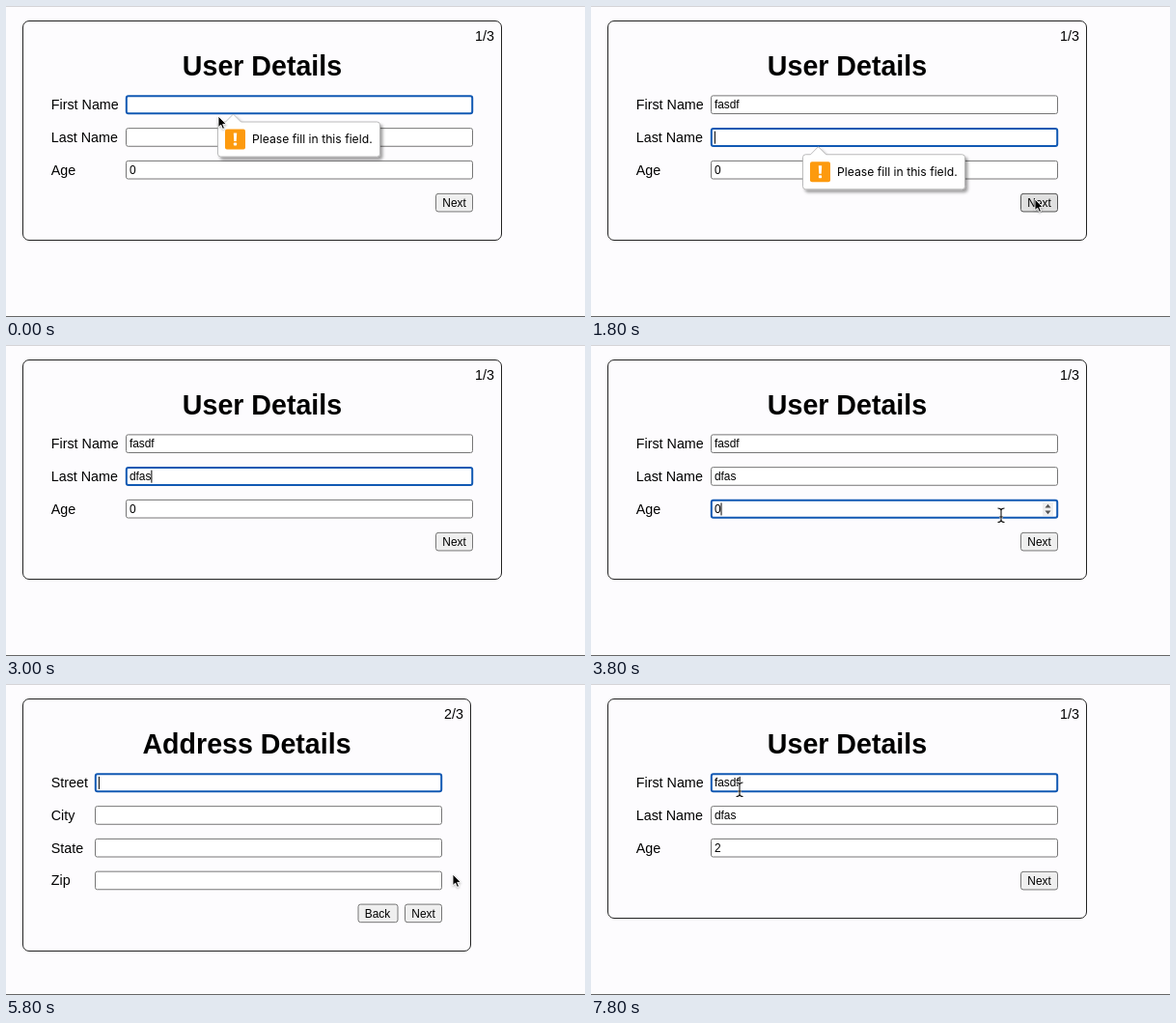
Write an HTML page that moves like this. It is 600x322 px and loops after 8 s.

```html
<!DOCTYPE html>
<html lang="en">
<head>
<meta charset="utf-8">
<title>Multi-step form</title>
<style>
  html, body { margin: 0; width: 100%; height: 100%; overflow: hidden; background: #fdfcfe; }
  svg { display: block; width: 100vw; height: 100vh; font-family: "Liberation Sans", Arial, sans-serif; }
  .label { font-size: 14.3px; }
  .control { font-size: 11.9px; }
  .title { font-size: 28.6px; font-weight: bold; text-anchor: middle; }
  .hint { font: 12.2px Inter, "Open Sans", sans-serif; }
</style>
</head>
<body>
<svg id="stage" viewBox="0 0 600 322">
  <defs>
    <filter id="shadow" x="-10%" y="-20%" width="125%" height="160%">
      <feDropShadow dx="2.5" dy="3" stdDeviation="1.8" flood-opacity=".38"/>
    </filter>
    <filter id="soft" x="-50%" y="-50%" width="200%" height="200%">
      <feDropShadow dx="0" dy="1" stdDeviation=".8" flood-opacity=".3"/>
    </filter>
  </defs>
  <path d="M0 .5H600" stroke="#d5d4d7"/>
  <path d="M0 321.5H600" stroke="#666"/>
  <g id="scene"></g>
</svg>
<script>
const LOOP = 8000, ROW = 33.75;
const scene = document.getElementById('scene');
const ruler = document.createElement('canvas').getContext('2d');
ruler.font = '11.9px "Liberation Sans", Arial, sans-serif';

const PAGES = [
  { title: 'User Details', tag: '1/3', labels: ['First Name', 'Last Name', 'Age'],
    right: 513.5, bottom: 242.5, left: 124.5, buttons: [['Next', 445.5, 38]] },
  { title: 'Address Details', tag: '2/3', labels: ['Street', 'City', 'State', 'Zip'],
    right: 481.5, bottom: 276.5, left: 92.5, buttons: [['Back', 365, 41], ['Next', 413.5, 38]] }
];

// Each step changes only the listed parts of the state; at = [x, y], null hides the pointer.
const START = { page: 0, values: ['', '', '0'], focus: 0, caret: false, hint: true,
                at: [220, 114], beam: false, hover: '', press: '', select: false };
const STEPS = [
  [0, {}],
  [200, { at: [150, 88] }],
  [400, { at: [70, 63] }],
  [600, { at: null, hint: false, values: ['f', '', '0'], caret: true }],
  [800, { values: ['fas', '', '0'] }],
  [1000, { values: ['fasdf', '', '0'] }],
  [1200, { at: [417, 194] }],
  [1400, { at: [460, 200], hover: 'Next' }],
  [1600, { press: 'Next', focus: -1 }],
  [1800, { press: '', focus: 1, hint: true }],
  [2000, { at: [345, 180], hover: '', caret: false }],
  [2200, { at: [213, 150], caret: true }],
  [2400, { at: [93, 112], beam: true }],
  [2600, { at: null, hint: false, values: ['fasdf', 'd', '0'] }],
  [2800, { values: ['fasdf', 'dfa', '0'] }],
  [3000, { values: ['fasdf', 'dfas', '0'] }],
  [3400, { at: [270, 140] }],
  [3600, { at: [424, 174] }],
  [3800, { at: [425, 176], focus: 2 }],
  [4000, { at: [240, 175] }],
  [4200, { at: [64, 173], select: true, caret: false }],
  [4600, { at: null, select: false, caret: true, values: ['fasdf', 'dfas', '2'] }],
  [5000, { at: [340, 187], beam: false }],
  [5200, { at: [440, 194] }],
  [5400, { at: [463, 197], hover: 'Next' }],
  [5600, { press: 'Next', focus: -1 }],
  [5800, { page: 1, focus: 0, press: '', hover: '' }],
  [6000, { at: [455, 207] }],
  [6200, { at: [418, 226], hover: 'Next' }],
  [6400, { at: [388, 235], hover: 'Back' }],
  [6600, { at: [385, 236], focus: -1, press: 'Back' }],
  [6800, { page: 0, focus: 0, hover: '', press: '' }],
  [7000, { at: [250, 165] }],
  [7200, { at: [153, 107], beam: true }],
  [7400, { at: [154, 109], caret: false }],
  [7800, { caret: true }]
];

const text = (cls, x, y, words) => `<text class="${cls}" x="${x}" y="${y}">${words}</text>`;
const rect = (x, y, w, h, r, fill, stroke = 'none', line = 1) =>
  `<rect x="${x}" y="${y}" width="${w}" height="${h}" rx="${r}" fill="${fill}" stroke="${stroke}" stroke-width="${line}"/>`;

function spinner(y) {
  return rect(468, y + 3, 11, 14, 0, '#efefef') +
    `<path d="M470.5 ${y + 8.4}l3 -3.6 3 3.6zM470.5 ${y + 11.6}l3 3.6 3 -3.6z" fill="#555"/>`;
}

function field(page, i, s) {
  const y = 92.9 + ROW * i, x = page.left, focused = s.focus === i;
  const value = s.page === 0 ? s.values[i] : '';
  const width = ruler.measureText(value).width;
  let out = text('label', 46.8, y + 14.2, page.labels[i]);
  out += focused ? rect(x + .3, y + .3, 358.4, 18, 2, '#fff', '#1159b3', 2)
                 : rect(x, y, 359, 18.6, 2, '#fff', '#767676');
  if (focused && s.select) out += rect(x + 3.5, y + 3, width, 13.5, 0, '#b3d7fe');
  out += text('control', x + 3.4, y + 13.4, value);
  if (focused && s.caret) out += rect(x + 3.4 + width, y + 3, 1, 13, 0, '#000');
  if (focused && i === 2) out += spinner(y - .4);
  return out;
}

function button([name, x, w], y, s) {
  const pressed = s.press === name, hovered = s.hover === name;
  const fill = pressed ? '#f3f3f3' : hovered ? '#e0e0e0' : '#efefef';
  return rect(x, y, w, 18.6, 2.5, fill, hovered && !pressed ? '#555' : '#767676') +
    text('control', x + 6.8, y + 13.4, name);
}

function hint(row) {
  const y = 120 + ROW * row;
  return `<path filter="url(#shadow)" fill="#fff" stroke="#aaa" stroke-width=".8"
      d="M222.5 ${y}H227.5L235.5 ${y - 8}L243.5 ${y}H384.5q3 0 3 3v30q0 3 -3 3H222.5q-3 0 -3 -3v-30q0 -3 3 -3z"/>` +
    rect(227, y + 7.5, 21, 21, 2, '#fd9a0e') +
    `<path d="M235.8 ${y + 11.5}h3.4l-.5 8.5h-2.4z" fill="#fff"/>` +
    rect(235.9, y + 21.4, 3.2, 3.2, .8, '#fff') +
    text('hint', 255, y + 22.4, 'Please fill in this field.');
}

function pointer([x, y], beam) {
  const shape = 'M-3.5 -7Q-.5 -7 0 -5Q.5 -7 3.5 -7M0 -5V5.5M-3.5 7.5Q-.5 7.5 0 5.5Q.5 7.5 3.5 7.5M-1.8 2H1.8';
  const body = beam
    ? `<path d="${shape}" fill="none" stroke="#fff" stroke-width="2.4"/><path d="${shape}" fill="none" stroke="#111" stroke-width="1.1"/>`
    : '<path d="M0 0V11.6L2.7 9.1L4.5 13.3L6.5 12.5L4.7 8.4H8.3Z" fill="#000" stroke="#fff" stroke-width=".9" filter="url(#soft)"/>';
  return `<g transform="translate(${x} ${y})">${body}</g>`;
}

function draw(s) {
  const page = PAGES[s.page], middle = (17.5 + page.right) / 2;
  return rect(17.5, 15.5, page.right - 17.5, page.bottom - 15.5, 6.5, 'none', '#222') +
    text('label', page.right - 27.5, 36.4, page.tag) +
    text('title', middle, 71.8, page.title) +
    page.labels.map((_, i) => field(page, i, s)).join('') +
    page.buttons.map(b => button(b, 93.1 + ROW * page.labels.length, s)).join('') +
    (s.hint ? hint(s.focus) : '') +
    (s.at ? pointer(s.at, s.beam) : '');
}

let state = START;
const timeline = STEPS.map(([time, change]) => {
  state = { ...state, ...change };
  return { time, markup: draw(state) };
});

let shown;
function tick() {
  const now = performance.now() % LOOP;
  const step = timeline.filter(entry => entry.time <= now).pop();
  if (step !== shown) {
    shown = step;
    scene.innerHTML = step.markup;
  }
  requestAnimationFrame(tick);
}
tick();
</script>
</body>
</html>
```
